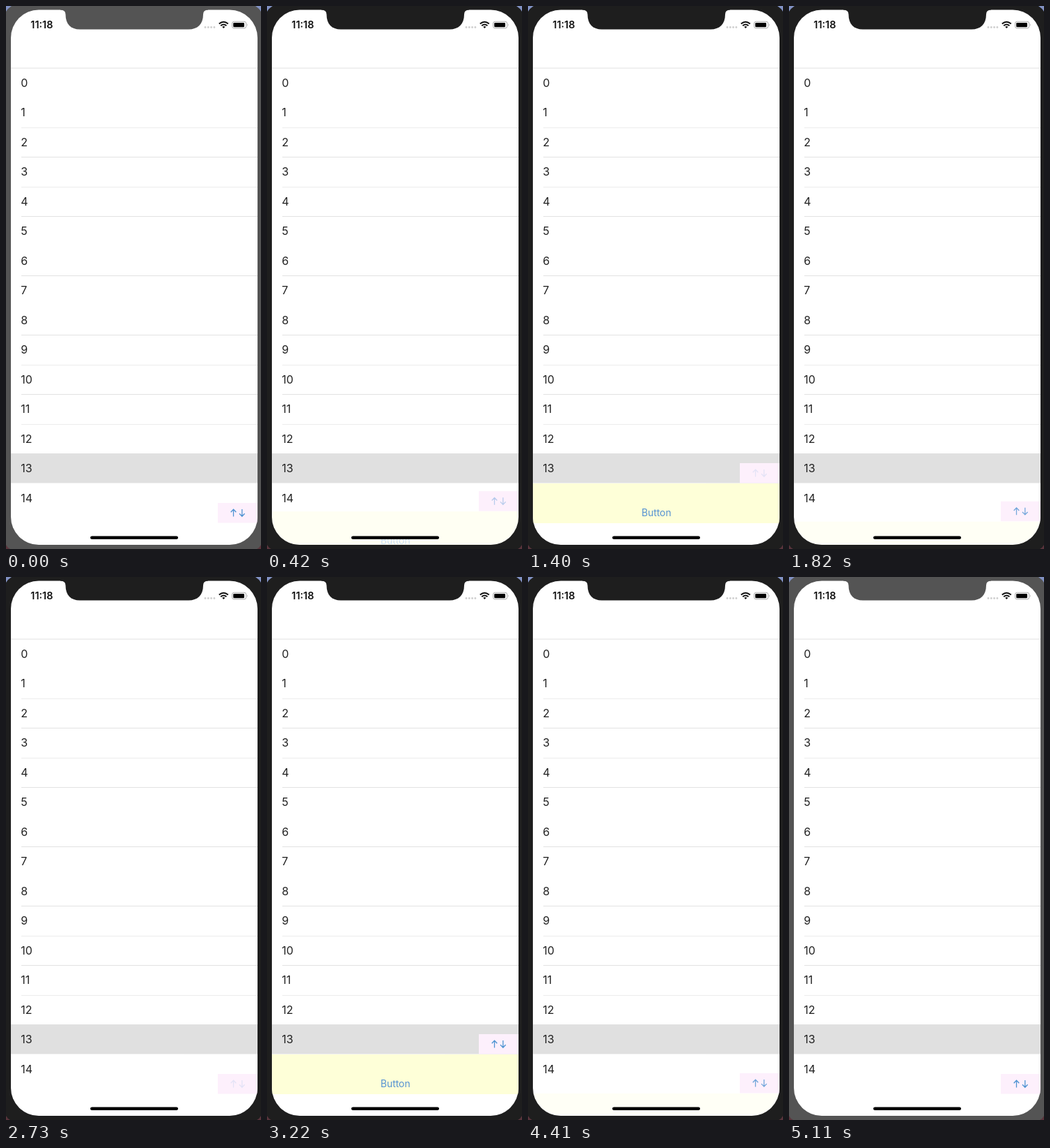
These frames come from a looping animation (366x778 px, 5.18 s). An HTML page:

```html
<!DOCTYPE html>
<html lang="en">
<head>
<meta charset="utf-8">
<title>Sliding panel</title>
<style>
  html, body { margin: 0; width: 100%; height: 100%; overflow: hidden; background: #1e1e1e; }
  svg { display: block; width: 366px; height: 778px; }
  text { font-family: Inter, Roboto, sans-serif; }
</style>
</head>
<body>
<svg viewBox="0 0 366 778" xmlns="http://www.w3.org/2000/svg">
  <defs>
    <clipPath id="screen"><rect x="7" y="5.5" width="354" height="766.5" rx="40"/></clipPath>
  </defs>

  <rect class="bezel" width="366" height="778"/>
  <path d="M0 0H8Q3 3 0 8ZM366 0H358Q363 3 366 8Z" fill="#8292c4"/>
  <path d="M0 778H6Q2 776 0 772ZM366 778H360Q364 776 366 772Z" fill="#59343c"/>

  <g clip-path="url(#screen)">
    <rect width="366" height="778" fill="#fff"/>
    <g id="rows"></g>
    <g id="panel">
      <rect x="7" y="684" width="354" height="57" fill="#feffd8"/>
      <text x="184.3" y="731" font-size="13.8" text-anchor="middle" fill="#5592d2">Button</text>
    </g>
    <g id="toggle">
      <rect x="304" y="655" width="57" height="28.5" fill="#fdf0fc"/>
      <path id="arrows" d="M326.5 674.5V664.5M322.7 668.3L326.5 664.3L330.3 668.3
        M338.8 664V674M335 670.2L338.8 674.2L342.6 670.2"
        fill="none" stroke="#4d93d2" stroke-width="1.3"/>
    </g>
    <rect x="121" y="759.5" width="126" height="4.6" rx="2.3"/>
  </g>

  <path class="bezel" d="M78 4V5.5Q85.500 5.500 85.500 12C85.500 26 93 33.500 106 33.500H262C275 33.500 283 26 283 12Q283 5.500 290 5.500V4Z"/>

  <text x="35.300" y="32.200" font-size="14.400" font-weight="600" fill="#111">11:18</text>
  <g fill="#cfcfcf">
    <circle cx="286" cy="30.500" r="1.400"/><circle cx="290.300" cy="30.500" r="1.400"/>
    <circle cx="294.600" cy="30.500" r="1.400"/><circle cx="298.900" cy="30.500" r="1.400"/>
  </g>
  <g fill="none" stroke="#111" stroke-width="2">
    <path d="M305.800 25.600Q312.300 20 318.800 25.600M308.200 28.300Q312.300 24.800 316.400 28.300"/>
    <path d="M310.200 29.800Q312.300 28.200 314.400 29.800L312.300 32Z" fill="#111" stroke="none"/>
  </g>
  <rect x="324.600" y="22.300" width="20" height="9.600" rx="2.700" fill="#fff" stroke="#aaa"/>
  <rect x="326.200" y="23.900" width="15.800" height="6.400" rx="1.400" fill="#000"/>
  <path d="M346 25.300Q347.800 27.100 346 28.900Z" fill="#aaa"/>
</svg>
<script>
const LOOP = 5180, STEP = 70;
const TRAVEL = 57, SLIDE_MS = 250, FADE_MS = 300;
const ACTIVE = [210, 4760];
const TAPS = [
  { press: 210, release: 330, show: true },
  { press: 1400, release: 1600, show: false },
  { press: 2700, release: 2860, show: true },
  { press: 3990, release: 4180, show: false }
];

const $ = id => document.getElementById(id);
const bezels = document.querySelectorAll('.bezel');
const clamp = x => Math.min(1, Math.max(0, x));
const smooth = x => x * x * (3 - 2 * x);

function buildRows() {
  const pitch = 42.5, top = 89;
  const hiddenLines = [1, 6, 8, 14];
  let markup = `<rect x="7" y="${top - .5}" width="354" height="1" fill="#e2e2e2"/>`;
  for (let i = 0; i < 15; i++) {
    const y = top + pitch * i;
    if (i === 13) {
      markup += `<rect x="7" y="641" width="354" height="42.500" fill="#e0e0e0"/>`;
    } else if (i && !hiddenLines.includes(i)) {
      const color = i % 2 ? '#e2e2e2' : '#ececec';
      markup += `<rect x="22" y="${Math.floor(y)}" width="339" height="1" fill="${color}"/>`;
    }
    markup += `<text x="21.300" y="${y + 26.9}" font-size="16" fill="#222">${i}</text>`;
  }
  $('rows').innerHTML = markup;
}

function render(t) {
  let shown = 0, alpha = 0, arrows = 1;
  for (const { press, release, show } of TAPS) {
    if (t < press) break;
    const since = t - release;
    const fade = clamp(since / FADE_MS);
    arrows = .14 + .86 * fade;
    if (since < 0) break;
    const slide = smooth(clamp(since / SLIDE_MS));
    shown = show ? slide : 1 - slide;
    alpha = show ? fade : 1 - fade;
  }
  const shift = `translate(0 ${(TRAVEL * (1 - shown)).toFixed(2)})`;
  $('panel').setAttribute('transform', shift);
  $('panel').setAttribute('opacity', alpha);
  $('toggle').setAttribute('transform', shift);
  $('arrows').setAttribute('opacity', arrows);

  const active = t >= ACTIVE[0] && t < ACTIVE[1];
  bezels.forEach(b => b.setAttribute('fill', active ? '#1e1e1e' : '#545454'));
}

buildRows();
render(0);
const start = performance.now();
function tick() {
  const t = (performance.now() - start) % LOOP;
  render(Math.floor(t / STEP) * STEP);
  requestAnimationFrame(tick);
}
requestAnimationFrame(tick);
</script>
</body>
</html>
```
